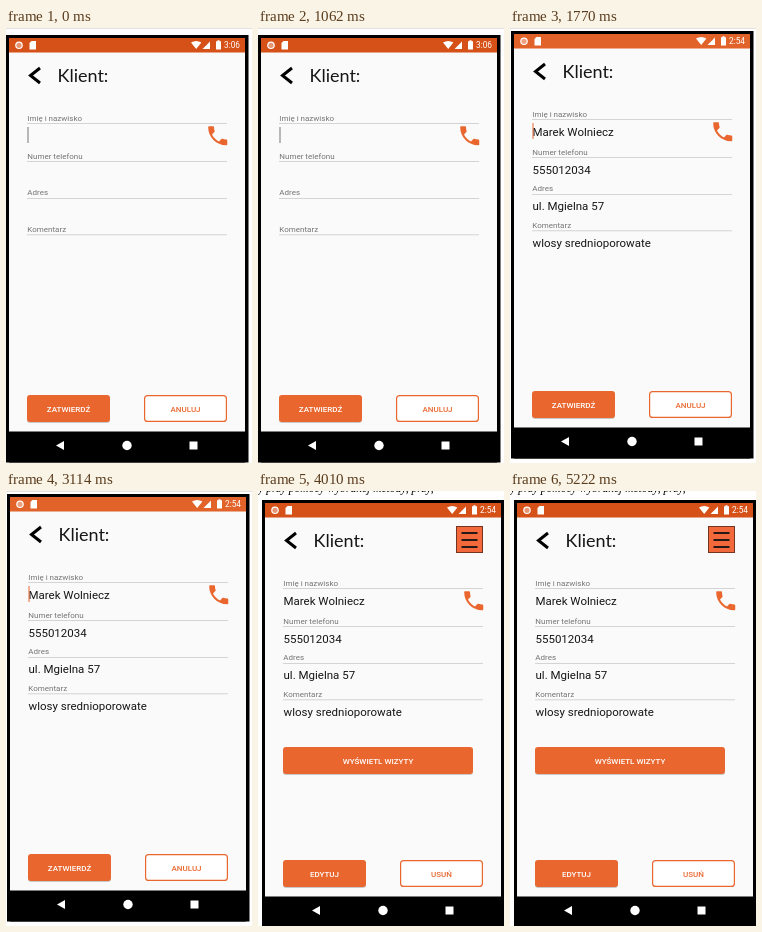
Write an HTML page that moves like this. It is 246x435 px and loops after 6030 ms.

```html
<!DOCTYPE html>
<html lang="pl">
<meta charset="utf-8">
<style>
  html, body { margin: 0; width: 100%; height: 100%; overflow: hidden; background: #fff; }
  svg { display: block; width: 100vw; height: 100vh; font-family: Roboto, sans-serif; }
  .label { font-size: 8px; fill: #757575; }
  .value { font-size: 11.5px; fill: #161616; }
  .button { font-size: 8px; font-weight: 500; text-anchor: middle; }
</style>
<svg id="stage" viewBox="0 0 246 435"></svg>
<script>
const ORANGE = '#e9672f', DURATION = 6030;
const labels = ['Imię i nazwisko', 'Numer telefonu', 'Adres', 'Komentarz'];
const labelY = [92.5, 130.5, 167, 204];
const lineY = [95, 133, 170, 206.5];
const values = ['Marek Wolniecz', '555012034', 'ul. Mgielna 57', 'wlosy srednioporowate'];
const valueY = [111.5, 150, 186, 222.5];

const screens = [
  { until: 1770, x: 0, y: 0, time: '3:06', bar: '#d65118', cursor: '#777',
    buttons: ['ZATWIERDŹ', 'ANULUJ'] },
  { until: 4010, x: 1, y: -4, time: '2:54', bar: '#e2632a', cursor: ORANGE, filled: true,
    buttons: ['ZATWIERDŹ', 'ANULUJ'] },
  { until: DURATION, x: 4, y: 2, time: '2:54', bar: '#d65118', filled: true, details: true,
    buttons: ['EDYTUJ', 'USUŃ'] }
];

const rect = (x, y, w, h, fill, extra = '') =>
  `<rect x="${x}" y="${y}" width="${w}" height="${h}" fill="${fill}" ${extra}/>`;
const text = (x, y, str, cls, extra = '') =>
  `<text x="${x}" y="${y}" class="${cls}" ${extra}>${str}</text>`;

function button(x, y, w, label, outlined) {
  const shape = outlined
    ? rect(x + .6, y + .6, w - 1.2, 25.8, '#fff', `rx="3" stroke="${ORANGE}" stroke-width="1.2"`)
    : rect(x, y + 1, w, 27, '#0003', 'rx="3"') + rect(x, y, w, 27, ORANGE, 'rx="3"');
  return shape + text(x + w / 2, y + 16.5, label, 'button', `fill="${outlined ? ORANGE : '#fff'}"`);
}

const statusBar = s => rect(3, 10, 236, 14.5, s.bar) + `
  <circle cx="13" cy="17.3" r="3.2" fill="#fff6" stroke="#fff" stroke-width="1.2"/>
  <path fill="#fff" d="M25.5 13h4.5v8.5h-6.5v-6.5z
    M185 14.5q5.2-3 10.4 0l-5.2 6.5z M204 13.5v7.5h-7.5z
    M210 13.3h1.5v-1h2v1h1.500v8.200h-5z"/>
  <text x="218" y="20.300" font-size="8.300" fill="#fff">${s.time}</text>`;

const header = `
  <path d="M34 40l-9.500 7.500 9.500 7.500" fill="none" stroke="#000" stroke-width="3"/>
  <text x="51.500" y="54" font-size="18" fill="#151515" font-family="Lato, sans-serif">Klient:</text>`;

const phone = `<path transform="translate(199 95) scale(1.06)" fill="${ORANGE}"
  d="M6.620 10.790c1.440 2.830 3.760 5.140 6.590 6.590l2.200-2.200c.27-.27.67-.36 1.020-.24
  1.120.37 2.330.57 3.570.57.55 0 1 .45 1 1V20c0 .55-.45 1-1 1-9.390 0-17-7.610-17-17
  0-.55.45-1 1-1h3.500c.55 0 1 .45 1 1 0 1.250.2 2.450.57 3.570.11.35.03.74-.25 1.020z"/>`;

const menu = rect(194.5, 33.5, 26, 26, '#f3693c', 'stroke="#733420"') +
  [40, 47, 54].map(y => rect(199.5, y - .9, 16, 1.8, '#111')).join('');

const navigation = rect(3, 403.5, 236, 31, '#000') + `
  <path d="M50 417.500l8-4.500v9z" fill="#fff"/>
  <circle cx="121" cy="417.500" r="4.700" fill="#fff"/>` + rect(183.5, 413.5, 8, 8, '#fff');

function draw(s) {
  const fields = labels.map((label, i) =>
    text(21.3, labelY[i], label, 'label') + rect(21, lineY[i], 200, .7, '#c4c4c4') +
    (s.filled ? text(21.5, valueY[i], values[i], 'value') : '')).join('');
  const topEdge = s.details
    ? text(-3, 1, 'fy przy pomocy wybranej metody, przy,', '',
        'font-family="Liberation Serif, serif" font-style="italic" font-size="11.500"')
    : rect(0, 0, 246, .7, '#d9d2d4');
  return topEdge + `<g transform="translate(${s.x} ${s.y})">` +
    rect(0, 7, 242.5, 427.5, '#000') + rect(3, 10, 236, 394, '#fafafa') +
    statusBar(s) + header + fields + phone +
    (s.cursor ? rect(21.5, 99, 1, 16, s.cursor) : '') +
    (s.details ? menu + button(21, 254, 190, 'WYŚWIETL WIZYTY') : '') +
    button(21, 367, 83, s.buttons[0]) + button(138, 367, 83, s.buttons[1], true) +
    navigation + '</g>';
}

const stage = document.getElementById('stage');
const start = performance.now();
let shown;
function tick() {
  const t = (performance.now() - start) % DURATION;
  const screen = screens.find(s => t < s.until);
  if (screen !== shown) stage.innerHTML = draw(shown = screen);
  requestAnimationFrame(tick);
}
tick();
</script>
</html>
```
